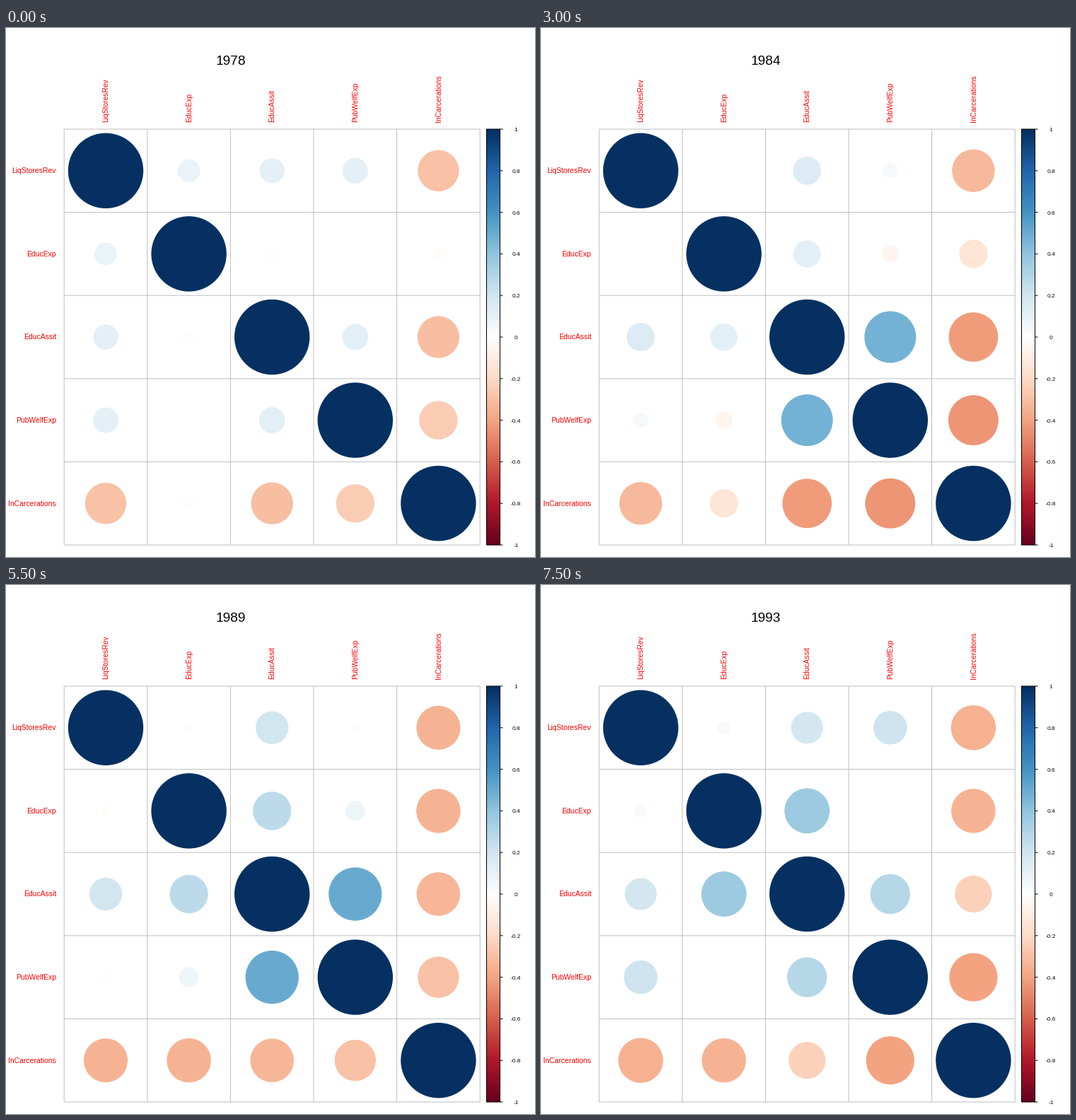
These frames come from a looping animation (748x748 px, 8 s). A matplotlib script:

```python
import numpy as np
import matplotlib.pyplot as plt
from matplotlib.animation import FuncAnimation
from matplotlib.colors import LinearSegmentedColormap
from matplotlib.patches import Circle, Rectangle

SIZE, DPI = 748, 100
LEFT, TOP, CELL = 82.2, 143.0, 117.6
BAR_L, BAR_R = 679.5, 698.5
RMAX = 53.2
PX = 72 / DPI
FIRST, YEARS = 1978, 16

NAMES = ["LiqStoresRev", "EducExp", "EducAssit", "PubWelfExp", "InCarcerations"]
N = len(NAMES)
SPAN = N * CELL

CMAP = LinearSegmentedColormap.from_list("corr", [
    "#67001F", "#B2182B", "#D6604D", "#F4A582", "#FDDBC7", "#FFFFFF",
    "#D1E5F0", "#92C5DE", "#4393C3", "#2166AC", "#053061"], N=200)

# Turning points (years since FIRST, correlation); straight runs between them
PATHS = {
    (0, 1): [(0, .09), (5, 0), (13, -.02), (15, .03)],
    (0, 2): [(3, .11), (11, .19), (13, 0), (15, .18)],
    (0, 3): [(0, .115), (6, .04), (13, 0), (15, .2)],
    (0, 4): [(0, -.3), (15, -.355)],
    (1, 2): [(0, -.02), (6, .13), (9, .07), (11, .26), (15, .36)],
    (1, 3): [(0, 0), (4, -.1), (11, .07), (13, -.03), (15, 0)],
    (1, 4): [(3, -.02), (11, -.345)],
    (2, 3): [(0, .12), (6.5, .5), (11, .5), (15, .28)],
    (2, 4): [(0, -.31), (6, -.43), (9, -.31), (11, -.335), (13, -.24)],
    (3, 4): [(0, -.26), (9, -.535), (11, -.3), (13, -.23), (15, -.41)],
}


def center(i):
    return (i + 0.5) * CELL


plt.rcParams["font.family"] = "Liberation Sans"
fig = plt.figure(figsize=(SIZE / DPI, SIZE / DPI), dpi=DPI, facecolor="white")
ax = fig.add_axes([0, 0, 1, 1])
ax.axis("off")


def line(xs, ys, col):
    ax.plot(xs, ys, color=col, lw=PX, solid_capstyle="butt", snap=False)


def label(x, y, s, px, col="black", ha="center", rot=0):
    return ax.text(x, y, s, fontsize=px * PX, color=col, ha=ha, va="baseline",
                   rotation=rot, rotation_mode="anchor")


def set_disc(patch, c):
    patch.set_radius(RMAX * abs(c) ** 0.5)
    patch.set_facecolor(CMAP((c + 1) / 2))


def disc(row, col, c=0):
    patch = Circle((LEFT + center(col), TOP + center(row)), 0, lw=0)
    set_disc(patch, c)
    return ax.add_patch(patch)


# Grid
for k in range(N + 1):
    x, y = LEFT + k * CELL, TOP + k * CELL
    line([x, x], [TOP, TOP + SPAN], "#BEBEBE")
    line([LEFT, LEFT + SPAN], [y, y], "#BEBEBE")

# Variable names and the diagonal
for i, name in enumerate(NAMES):
    label(71, TOP + center(i) + 3.4, name, 10.4, "red", "right")
    label(LEFT + center(i) + 3.4, 133.3, name, 10.3, "red", "left", 90)
    disc(i, i, 1)

# Colour scale
ax.imshow(np.linspace(1, 0, 200)[:, None], cmap=CMAP, vmin=0, vmax=1,
          extent=(BAR_L, BAR_R, TOP + SPAN, TOP), aspect="auto",
          interpolation="nearest")
ax.add_patch(Rectangle((BAR_L, TOP), BAR_R - BAR_L, SPAN, fill=False,
                       ec="black", lw=PX, snap=False))
for k in range(11):
    y = TOP + k * SPAN / 10
    line([BAR_R, BAR_R + 4], [y, y], "black")
    label(721, y + 3, f"{(5 - k) / 5:g}", 8.3)

pairs = [(disc(i, j), disc(j, i), *zip(*path)) for (i, j), path in PATHS.items()]
title = label(318, 52.3, "", 19.2)

ax.set_xlim(0, SIZE)
ax.set_ylim(SIZE, 0)


def draw(f):
    title.set_text(str(FIRST + f))
    for upper, lower, years, values in pairs:
        c = np.interp(f, years, values)
        set_disc(upper, c)
        set_disc(lower, c)
    return [title]


anim = FuncAnimation(fig, draw, frames=YEARS, interval=500, repeat=True,
                     repeat_delay=0, blit=False)
plt.show()
```
